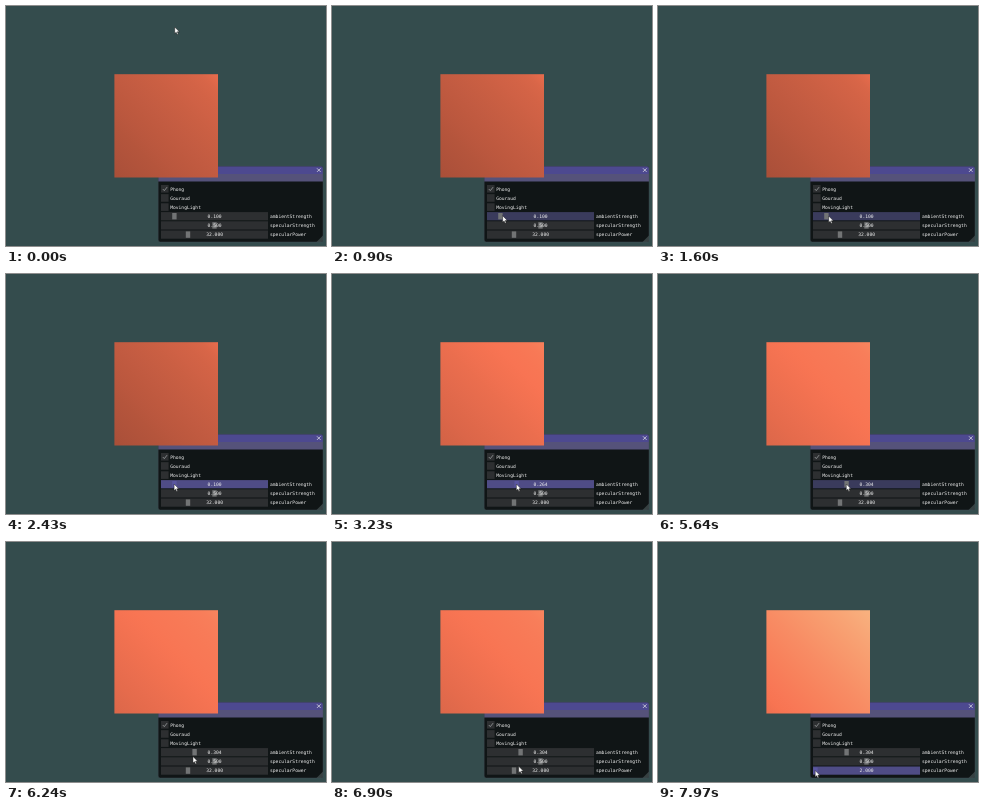
Recreate the animation shown at these times as an HTML page. Size 320 by 240 pixels, loop 8 s.

```html
<!DOCTYPE html>
<html lang="en">
<head>
<meta charset="utf-8">
<title>Phong lighting controls</title>
<style>
html, body { margin: 0; width: 100%; height: 100%; overflow: hidden; background: #344c4d; }
svg { display: block; width: 100vw; height: 100vh; }
text { font: 4.65px "DejaVu Sans Mono", "Noto Sans Mono", monospace; fill: #f2f2f2; text-rendering: geometricPrecision; white-space: pre; }
.value { text-anchor: middle; }
.frame { fill: #2d2f31; }
.grab { fill: #727475; }
.row.hover .frame { fill: #3a3b5c; }
.row.active .frame { fill: #4f4c86; }
.row.active .grab { fill: #5a56a0; }
</style>
</head>
<body>
<svg viewBox="0 0 320 240">
  <defs>
    <linearGradient id="shade" gradientUnits="userSpaceOnUse" x1="108.4" y1="171.5" x2="212" y2="68.2"></linearGradient>
    <clipPath id="panel"><rect x="152.2" y="160.2" width="164.8" height="75.8" rx="2"/></clipPath>
  </defs>
  <rect width="320" height="240" fill="#344c4d"/>
  <g clip-path="url(#panel)">
    <rect x="152" y="160" width="165" height="76" fill="#101516"/>
    <rect x="152" y="160" width="165" height="8" fill="#4d4990"/>
    <rect x="152" y="168" width="165" height="7.5" fill="#55527a"/>
    <path d="M317 229.5V236H310.5Z" fill="#364041"/>
  </g>
  <rect x="152.2" y="160.2" width="164.8" height="75.8" rx="2" fill="none" stroke="#454f58" stroke-width=".4"/>
  <path d="M311 162.3l3.6 3.6m0-3.6l-3.6 3.6" stroke="#eee" stroke-width=".7"/>
  <g id="checks"></g>
  <g id="sliders"></g>
  <rect x="108.4" y="68.2" width="103.6" height="103.3" fill="url(#shade)"/>
  <path id="cursor" d="M0 0V6.6L1.5 5.2L2.5 7.5L3.6 7L2.6 4.8H4.7Z" fill="#fff" stroke="#111" stroke-width=".45"/>
</svg>
<script>
const NS = "http://www.w3.org/2000/svg";
const LOOP = 8000;
const GRAB_AT = 2300, RELEASE_AT = 5050, POWER_GRAB_AT = 7150;
const AMBIENT_PX = 99, POWER_PX = 24.5 / 30;
const STOPS = 12;
const $ = id => document.getElementById(id);

function add(parent, tag, attrs, text = "") {
  const el = document.createElementNS(NS, tag);
  for (const k in attrs) el.setAttribute(k, attrs[k]);
  el.textContent = text;
  return parent.appendChild(el);
}

const progress = (t, a, b) => Math.min(1, Math.max(0, (t - a) / (b - a)));
const ease = (t, a, b) => {
  const u = progress(t, a, b);
  return u * u * (3 - 2 * u);
};
const bump = (t, a, b) => Math.sin(Math.PI * progress(t, a, b)) ** 2;

["Phong", "Gouraud", "MovingLight"].forEach((name, i) => {
  const y = 179 + i * 9.15;
  add($("checks"), "rect", { x: 155, y, width: 7.6, height: 7.6, class: "frame" });
  if (!i) add($("checks"), "path", { d: "M156.8 183l1.5 1.7l2.8-3.6", fill: "none", stroke: "#8d9091", "stroke-width": 0.9 });
  add($("checks"), "text", { x: 164.2, y: y + 5.7 }, name);
});

const rows = ["ambientStrength", "specularStrength", "specularPower"].map((name, i) => {
  const y = 206.1 + i * 9.2;
  const g = add($("sliders"), "g", {});
  add(g, "rect", { x: 155, y, width: 107, height: 8.2, class: "frame" });
  const grab = add(g, "rect", { y: y + 0.9, width: 4.4, height: 6.4, class: "grab" });
  const value = add(g, "text", { x: 208.6, y: y + 5.9, class: "value" });
  add(g, "text", { x: 264, y: y + 5.9 }, name);
  return { g, y, grab, value };
});

const stops = Array.from({ length: STOPS + 1 }, (_, i) => add($("shade"), "stop", { offset: i / STOPS }));

function light(ambient, strength, power) {
  stops.forEach((stop, i) => {
    const u = i / STOPS;
    const diffuse = 0.57 + 0.2 * u;
    const specular = strength * (0.38 + 0.55 * u) ** power;
    const k = ambient + diffuse + specular;
    const rgb = [252, 118, 84].map(c => Math.min(248, Math.round(c * k)));
    stop.setAttribute("stop-color", `rgb(${rgb})`);
  });
}

function draw(t) {
  const ambient = 0.1 + 0.204 * ease(t, 2600, 3480) - 0.086 * bump(t, 3500, 4800);
  const power = 32 - 30 * ease(t, 7250, 7850);

  // the pointer rides along with each dragged value
  const x = 169 + 2 * ease(t, 200, 1000) - 2.6 * ease(t, 1600, 2200)
    + AMBIENT_PX * (ambient - 0.1)
    - 1.6 * ease(t, 5640, 6440) - 5 * ease(t, 6900, 7100)
    + POWER_PX * (power - 32);
  const y = 21 + 197 * ease(t, 200, 1000) - 8 * ease(t, 1000, 1600)
    + 9 * bump(t, 5640, 6440) + 18.5 * ease(t, 6770, 6960);
  $("cursor").setAttribute("transform", `translate(${x - 0.3} ${y})`);

  const active = t >= GRAB_AT && t < RELEASE_AT ? 0 : t >= POWER_GRAB_AT ? 2 : -1;
  const values = [ambient, 0.5, power];
  const grabs = [158.5 + ambient * AMBIENT_PX, 208.5, 157.5 + (power - 2) * POWER_PX];

  rows.forEach((row, i) => {
    const over = y >= row.y && y <= row.y + 8.2;
    const state = active === i ? " active" : over && active < 0 ? " hover" : "";
    row.g.setAttribute("class", "row" + state);
    row.grab.setAttribute("x", grabs[i] - 2.2);
    row.value.textContent = values[i].toFixed(3);
  });
  light(ambient, 0.5, power);
}

function tick(now) {
  draw(now % LOOP);
  requestAnimationFrame(tick);
}
draw(0);
requestAnimationFrame(tick);
</script>
</body>
</html>
```
